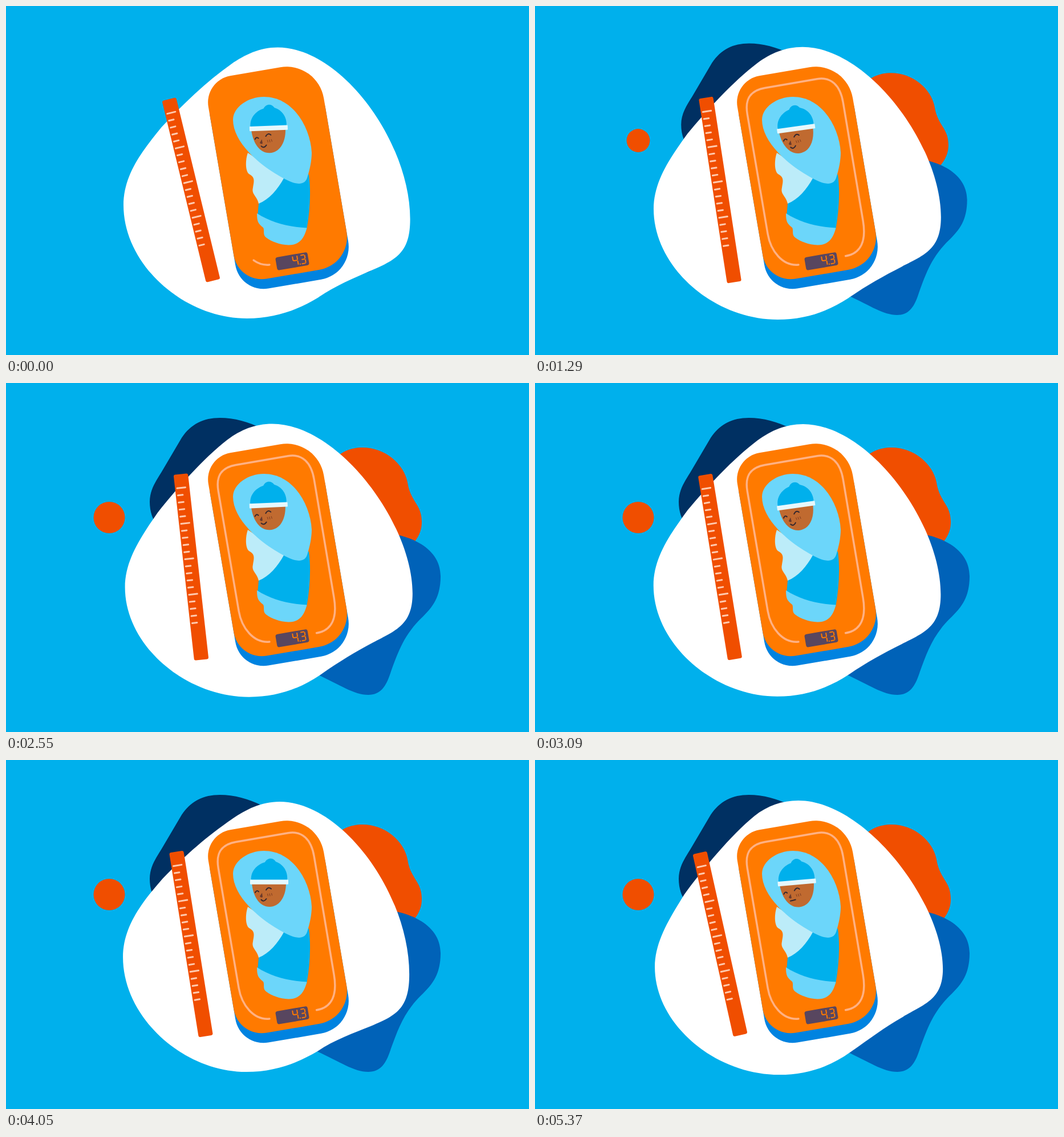
An HTML page for the animation above (5400 ms loop, 917 by 611 pixels).

```html
<!DOCTYPE html>
<html lang="en">
<head>
<meta charset="utf-8">
<title>Baby on a scale</title>
<style>
  html, body { margin: 0; width: 100%; height: 100%; overflow: hidden; background: #00b0ec; }
  svg { display: block; width: 100vw; height: 100vh; }
  .line { fill: none; stroke-linecap: round; stroke-linejoin: round; }
</style>
</head>
<body>
<svg viewBox="0 0 917 611">
  <path id="navy" fill="#003062" d="M450,80 C425,68 400,61 375,61 C346,61 324,72 308,96 L272,157 C262,173 252,188 252,208 C252,235 265,262 300,270 H450Z"/>
  <path id="red" fill="#f04e00" d="M570,140 C585,120 605,113 625,113 C665,113 698,142 704,174 C709,208 729,212 729,243 C729,258 724,268 715,280 L600,300Z"/>
  <path id="blue" fill="#0062b8" d="M650,262 C700,262 762,285 762,338 C762,375 748,392 731,409 C698,440 688,470 675,505 C667,530 658,546 635,546 C610,546 585,528 545,510 L540,400Z"/>
  <circle id="dot" cx="181" cy="235.500" fill="#f04e00"/>
  <path id="blob" fill="#fff"/>

  <g id="ruler">
    <rect x="-12.700" y="-163.500" width="25.400" height="327" rx="3" fill="#f04e00"/>
    <path id="ticks" class="line" stroke="#ffc9ae" stroke-width="3"/>
  </g>

  <defs>
    <path id="tray" d="M-101,-133 A47,47 0 0 1 -54,-180.500 H35 A66,66 0 0 1 101,-114 V122 A58,58 0 0 1 43,180.500 H-51 A50,50 0 0 1 -101,130Z"/>
  </defs>
  <use href="#tray" transform="translate(479.800 308.100) rotate(-9.700)" fill="#0083e0"/>
  <g transform="translate(476.900 291.100) rotate(-9.700)">
    <use href="#tray" fill="#ff7a00"/>
    <path id="rim" class="line" pathLength="1" stroke="#ffb183" stroke-width="3.500"
      d="M-42,157 C-70,155 -86,125 -86,95 V-118 C-86,-145 -74,-158 -48,-158 H45 C70,-158 83,-140 83,-110 L82.500,100 C82.500,135 70,156 42,156"/>
    <rect x="-30" y="146.300" width="57" height="23" rx="4" fill="#58465f"/>
    <path class="line" stroke="#ff7a00" stroke-width="2" d="M0,150.500 V156 L1.500,157.500 H6.500 M8,150.500 V156 M8,159 V164.500 M11.300,165 h.2 M15,150 H20 M21.500,151.500 V156 M16,157.500 H20 M21.500,159 V163.500 M15,165 H20"/>
  </g>

  <path fill="#00b0ec" d="M443,346 L487,300 L531,295 C535,325 533,360 527,392 L500,400 L441,369Z"/>
  <path fill="#6cd6fa" d="M440,363 C465,379 495,387 527.500,388.500 C523,406 515,419 495,418.500 C480,418 465,412 457,406 C449,400 454,394 451,388 C442,381 440,377 440,363Z"/>
  <path fill="#bcecf9" d="M424,257 C420,268 419,288 426,294 C437,300 435,306 433,318 C430,330 440,332 443,346 C462,338 476,322 488,300Z"/>
  <path fill="#6cd6fa" d="M452,159 C425,159 398,177 398,199 C398,244 458,290 500,308 C514,313 524,312 528,301 C533,285 536,270 536,257 C534,215 505,159 452,159Z"/>

  <g id="head">
    <path fill="#c06a30" d="M431,215 H491 C491,240 479,257 462,257 C445,257 433,240 431,215Z"/>
    <path fill="#00b0ec" d="M430,212 C428,195 440,183 454,179 C458,171 468,170 473,178 C487,183 495,196 493,212Z"/>
    <rect x="428" y="209.500" width="67" height="8.200" rx="1" fill="#e6f8fd"/>
    <path fill="#6b3a2b" d="M449,232.500 L445,238.500 Q447,242 450,240Z"/>
    <path class="line" stroke="#8a4523" stroke-width="1.200" d="M458.500,234.500 l1,3.500 M462,234 l1,4 M465.500,233.500 l1,3.500"/>
    <g class="line" stroke="#33272f" stroke-width="2">
      <path d="M437,232 Q439.500,227 443,230.500 M456,227.500 Q460,221 465,225.500"/>
      <path id="mouth"/>
    </g>
  </g>
</svg>
<script>
const LOOP = 5.4;
const $ = id => document.getElementById(id);
const wave = (t, peak, period) => Math.cos(2 * Math.PI * (t - peak) / period);
const ease = u => Math.sin(Math.PI / 2 * Math.min(1, Math.max(0, u))) ** 2;

// The white blob sways between two outlines with the same nodes.
const blobA = 'M480,73 C590,73 707,235 707,375 C707,432 688,447 640,466 C610,478 575,490 546,510 C510,531 470,546 421,546 C310,546 205,450 205,345 C205,290 240,247 275,207 C316,165 352,134 397,103 C421,87 447,73 480,73Z';
const blobB = 'M462,71 C580,71 715,250 715,366 C715,420 682,428 645,450 C610,470 585,489 552,512 C515,538 475,551 428,551 C315,551 210,462 210,362 C210,318 235,278 262,235 C290,196 345,130 385,98 C408,80 433,71 462,71Z';
const sway = [[0, .2], [.6, .03], [1.55, .72], [2.05, .3], [2.8, .87], [3.45, .1], [4.25, 0], [5.4, 1.02]];

function mix(a, b, m) {
  const to = b.match(/\d+/g);
  let i = 0;
  return a.replace(/\d+/g, n => (+n + (to[i++] - n) * m).toFixed(2));
}

function track(keys, t) {
  const i = Math.max(1, keys.findIndex(k => k[0] > t));
  const [t0, v0] = keys[i - 1], [t1, v1] = keys[i];
  return v0 + (v1 - v0) * ease((t - t0) / (t1 - t0));
}

function grow(id, x, y, s) {
  $(id).setAttribute('transform', `translate(${x} ${y}) scale(${s}) translate(${-x} ${-y})`);
}

let ticks = '';
for (let i = 0; i < 20; i++) ticks += `M-9,${-139.5 + i * 12.5}H${i % 5 ? -.5 : 5.5}`;
$('ticks').setAttribute('d', ticks);

function draw(t) {
  const size = .5 + .5 * ease((t + .05) / 1.6);
  grow('navy', 386, 202, size);
  grow('red', 598, 244, size);
  grow('blue', 624, 387, size);
  $('dot').setAttribute('r', 27.5 * ease((t - .3) / 1.5));
  $('blob').setAttribute('d', mix(blobA, blobB, track(sway, t)));

  const lean = 9.6 - (4.1 - .2 * t) * wave(t, .91, 1.77);
  $('ruler').setAttribute('transform', `translate(324.5 322) rotate(${-lean})`);

  const drawn = ease((t + .17) / 1.4);
  $('rim').setAttribute('stroke-dasharray', drawn < 1 ? `${drawn} 2` : 'none');

  const nod = .5 - .5 * wave(t, .33, 1.86);
  $('head').setAttribute('transform', `translate(${-2.2 * nod} ${nod}) rotate(${-8 * nod} 462 225)`);

  const calm = ease((t - 1.6) / .3) - ease((t - 2.3) / .3) + ease((t - 4.95) / .3);
  $('mouth').setAttribute('d', `M447.5,${244.5 + calm * .5} Q452,${249.5 - 5 * calm} 456.5,${243 + calm * .5}`);
}

function frame(now) {
  draw(now / 1000 % LOOP);
  requestAnimationFrame(frame);
}
draw(0);
requestAnimationFrame(frame);
</script>
</body>
</html>
```
